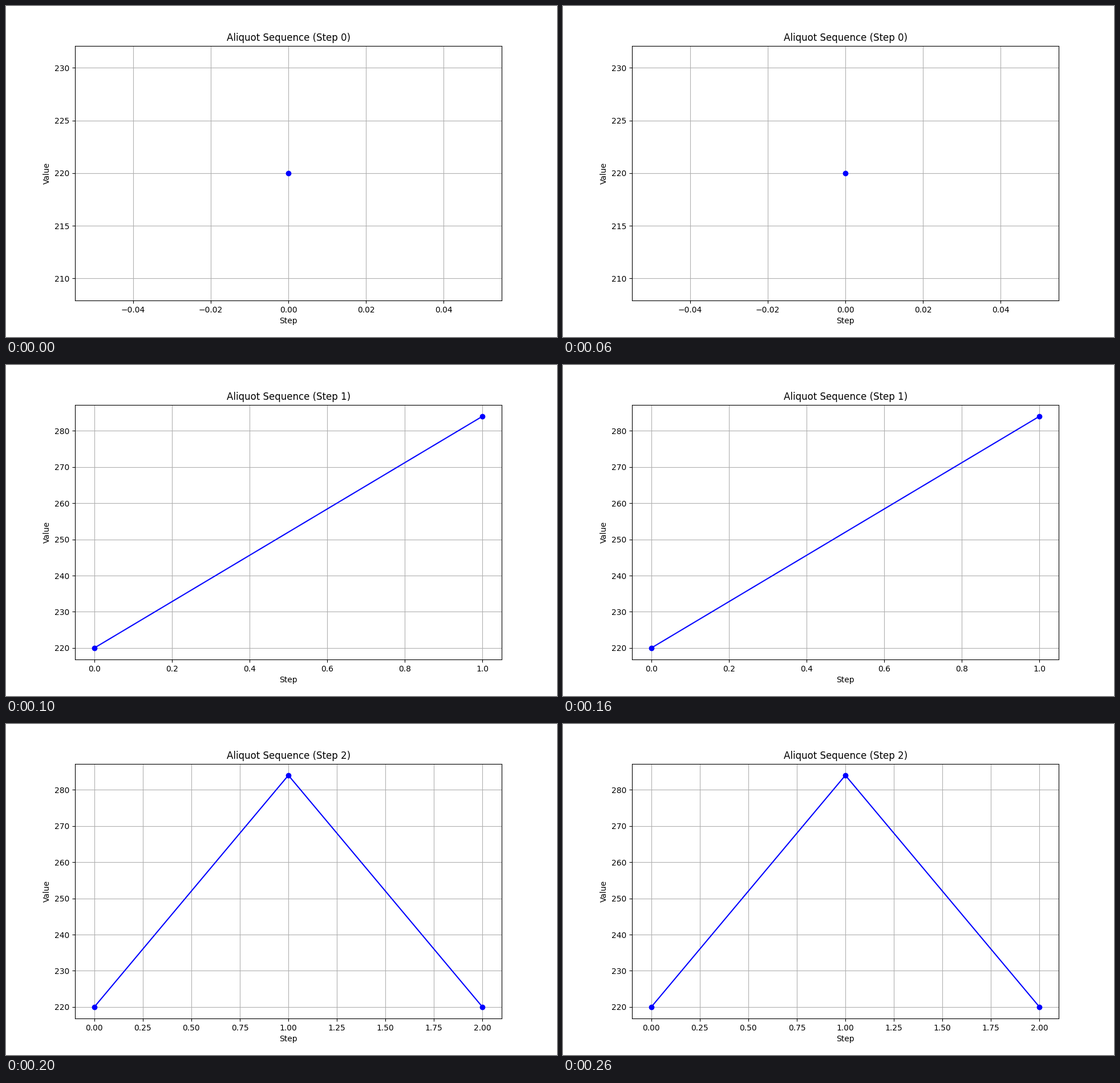
These frames come from a looping animation (966x580 px, 300 ms). A matplotlib script:

```python
import matplotlib.pyplot as plt
from matplotlib.animation import FuncAnimation

START = 220
STEPS = 3


def aliquot(n):
    """Sum of the proper divisors of n."""
    return sum(d for d in range(1, n // 2 + 1) if n % d == 0)


def sequence(start, count):
    values = [start]
    while len(values) < count:
        values.append(aliquot(values[-1]))
    return values


values = sequence(START, STEPS)
fig, ax = plt.subplots(figsize=(9.66, 5.8), dpi=100)


def draw(step):
    ax.clear()
    ax.plot(range(step + 1), values[:step + 1], "bo-")
    ax.set_title(f"Aliquot Sequence (Step {step})")
    ax.set_xlabel("Step")
    ax.set_ylabel("Value")
    ax.grid(True)


anim = FuncAnimation(fig, draw, frames=STEPS, interval=100,
                     init_func=lambda: draw(0), repeat=True, repeat_delay=0)
plt.show()
```
